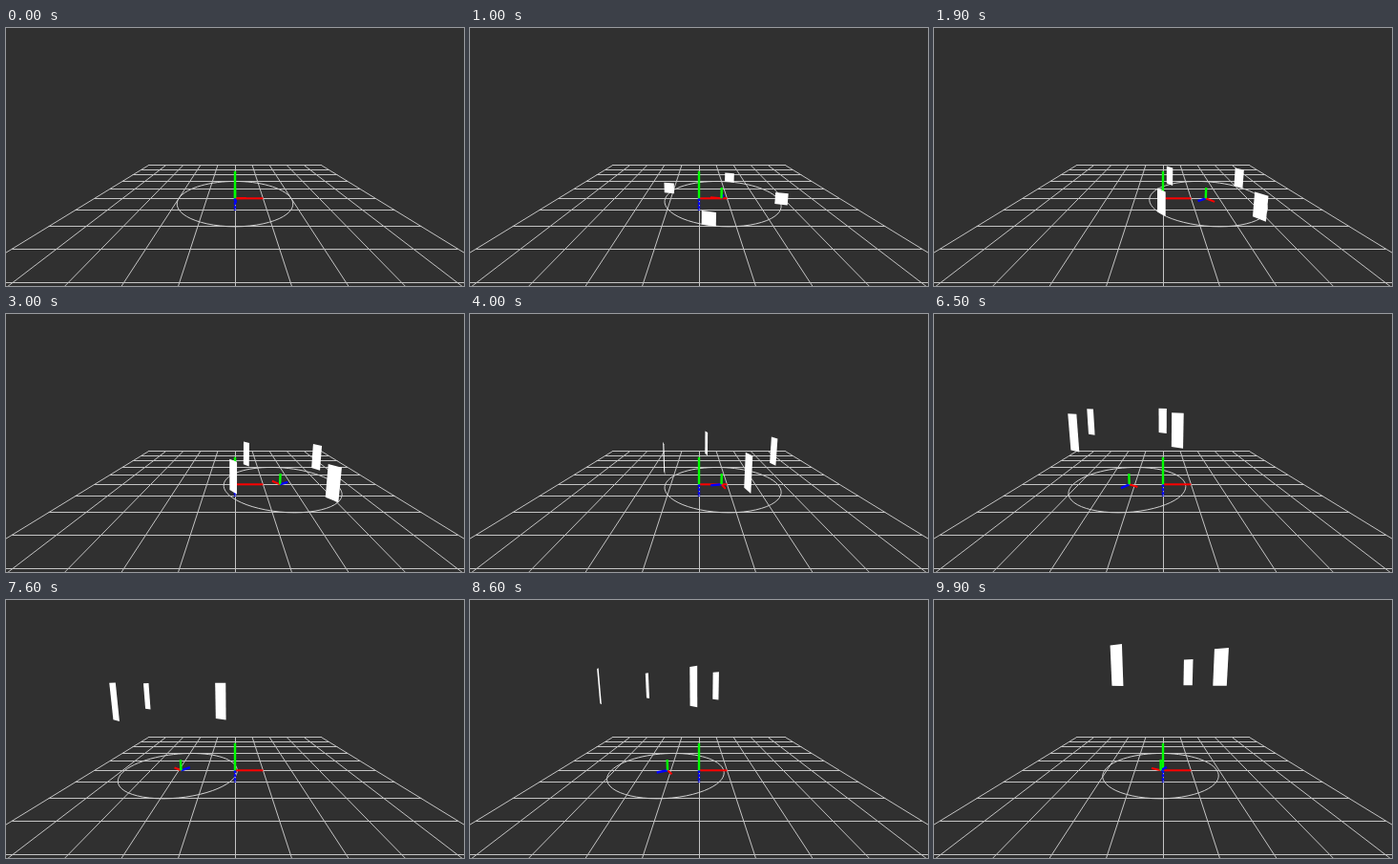
An HTML page with a canvas that plays this animation: 480 px wide and 270 px high, repeating every 10000 ms.

```html
<!DOCTYPE html>
<html lang="en">
<head>
<meta charset="utf-8">
<title>Rising panels</title>
<style>
html, body { margin: 0; width: 100%; height: 100%; overflow: hidden; background: #303030; }
canvas { display: block; width: 480px; height: 270px; }
</style>
</head>
<body>
<canvas id="stage" width="480" height="270"></canvas>
<script>
const ctx = document.getElementById("stage").getContext("2d");
const W = 480, H = 270, LOOP = 10000, STEP = 100;

// Camera at (0, 3, 7.5) looking at (0, 1.5, 0), 60 degree field of view.
const EYE_Y = 3, EYE_Z = 7.5;
const FOCAL = H / 2 / Math.tan(Math.PI / 6);
const PITCH = Math.atan2(1.5, EYE_Z);
const COS = Math.cos(PITCH), SIN = Math.sin(PITCH);

const RADIUS = 2, PANEL_W = 0.4, PANEL_H = 1;
const RED = "#f00", GREEN = "#0f0", BLUE = "#00f", WHITE = "#fff";
const GRID = "#c4c4c4", RING = "#d0d0d0";

function project(x, y, z) {
  const down = EYE_Y - y, away = EYE_Z - z;
  const depth = away * COS + down * SIN;
  return [W / 2 + FOCAL * x / depth,
          H / 2 + FOCAL * (down * COS - away * SIN) / depth];
}

function trace(points) {
  ctx.beginPath();
  for (const p of points) ctx.lineTo(p[0], p[1]);
}

function line(a, b, color, width) {
  trace([a, b]);
  ctx.strokeStyle = color;
  ctx.lineWidth = width;
  ctx.stroke();
}

function drawGrid() {
  for (let i = -5; i <= 5; i++) {
    const a = project(-5, 0, i), b = project(5, 0, i);
    a[1] = b[1] = Math.floor(a[1]) + 0.5;
    line(a, b, GRID, 1);
    const c = project(i, 0, -5), d = project(i, 0, 5);
    if (i === 0) c[0] = d[0] = W / 2 + 0.5;
    line(c, d, GRID, 1);
  }
}

function drawCircle(cx) {
  const points = [];
  for (let i = 0; i < 64; i++) {
    const a = i / 64 * 2 * Math.PI;
    points.push(project(cx + RADIUS * Math.cos(a), 0, RADIUS * Math.sin(a)));
  }
  trace(points);
  ctx.closePath();
  ctx.strokeStyle = RING;
  ctx.lineWidth = 1;
  ctx.stroke();
}

function drawAxes(cx, angle, size, dash) {
  const c = Math.cos(angle) * size, s = Math.sin(angle) * size;
  const o = project(cx, 0, 0);
  line(o, project(cx + c, 0, -s), RED, 2);
  ctx.setLineDash(dash);
  line(o, project(cx + s, 0, c), BLUE, 2.4);
  ctx.setLineDash([]);
  line(o, project(cx, size, 0), GREEN, 2.4);
}

// Panels share one heading and stay hidden below the ground.
function drawPanel(x, z, angle, base) {
  const low = Math.max(0, base), high = base + PANEL_H;
  if (high <= low) return;
  const dx = Math.cos(angle) * PANEL_W / 2, dz = -Math.sin(angle) * PANEL_W / 2;
  trace([
    project(x - dx, low, z - dz), project(x + dx, low, z + dz),
    project(x + dx, high, z + dz), project(x - dx, high, z - dz)
  ]);
  ctx.closePath();
  ctx.fillStyle = WHITE;
  ctx.fill();
}

// Triangle wave: 0, 2, 0, -2, 0 over one loop.
function sway(p) {
  return p < 0.25 ? 8 * p : p < 0.75 ? 4 - 8 * p : 8 * p - 8;
}

function draw(ms) {
  const p = ms / LOOP;
  const cx = sway(p);
  const angle = 0.08 + 27.9 * p;
  const base = 4 * p - 1;

  ctx.fillStyle = "#303030";
  ctx.fillRect(0, 0, W, H);
  drawGrid();
  drawCircle(cx);

  const panels = [0, 1, 2, 3].map(i => {
    const a = angle + i * Math.PI / 2;
    return { x: cx + RADIUS * Math.cos(a), z: -RADIUS * Math.sin(a) };
  }).sort((a, b) => a.z - b.z);
  const show = q => drawPanel(q.x, q.z, angle, base);

  panels.filter(q => q.z < 0).forEach(show);
  drawAxes(0, 0, 1, [3, 1]);
  drawAxes(cx, angle, 0.4, []);
  panels.filter(q => q.z >= 0).forEach(show);
}

const start = performance.now();
function tick() {
  const ms = (performance.now() - start) % LOOP;
  draw(Math.floor(ms / STEP) * STEP);
  requestAnimationFrame(tick);
}
tick();
</script>
</body>
</html>
```
